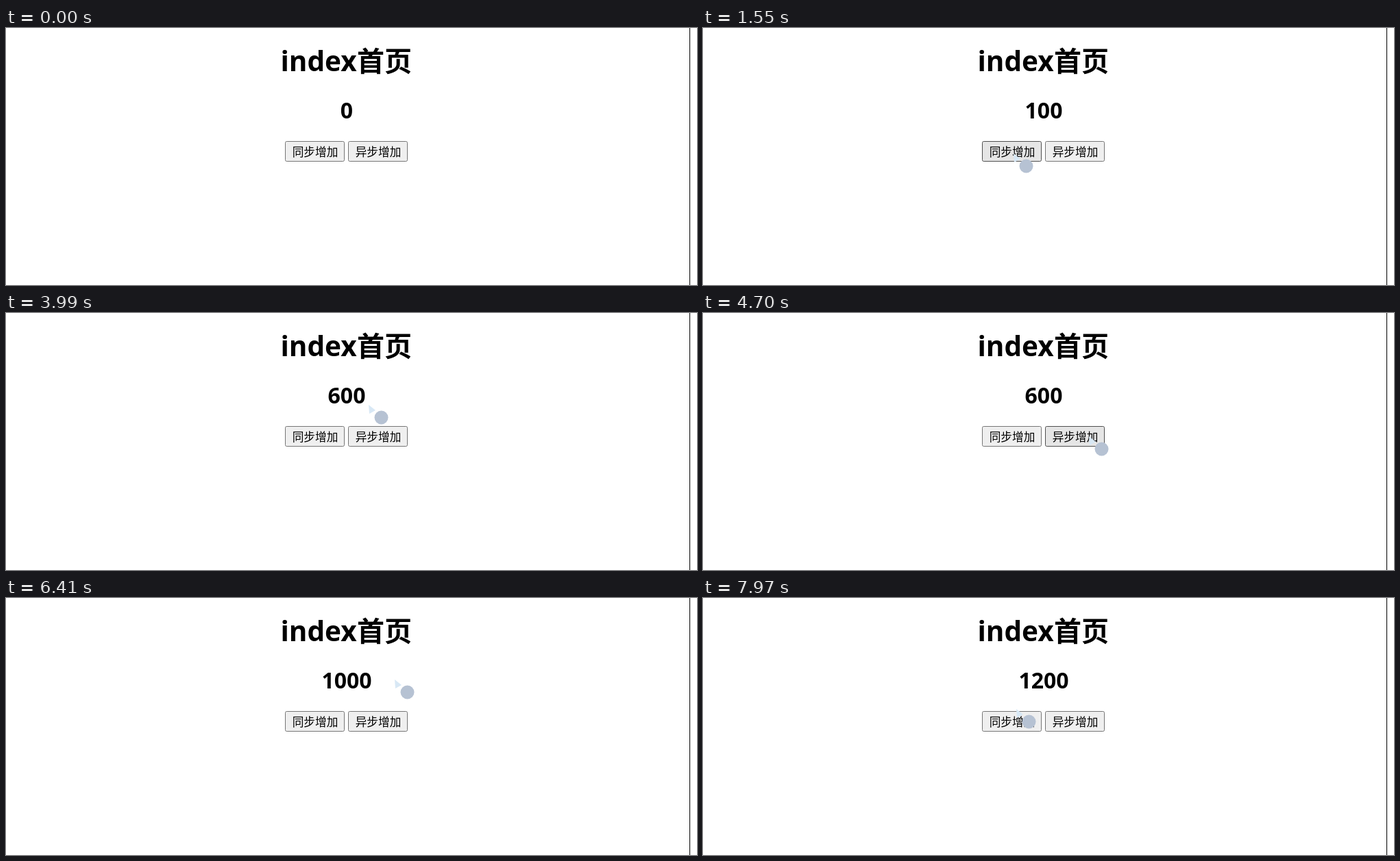
Animation of 1008x375 px, one loop 8000 ms. Source, as an HTML page with a canvas:

```html
<!DOCTYPE html>
<html lang="zh-CN">
<head>
<meta charset="utf-8">
<title>index首页</title>
<style>
html, body { margin: 0; width: 100%; height: 100%; overflow: hidden; background: #fff; }
canvas { display: block; }
</style>
</head>
<body>
<canvas id="stage" width="1008" height="375"></canvas>
<script>
const ctx = document.getElementById('stage').getContext('2d');
const LOOP = 8000, START = 70, OFFSET = 46, STEP = 78.4;
const HOLD = 2, DELAY = 4; // ticks a button stays down, ticks an async add takes
const CJK = '"Noto Sans CJK SC", "Noto Sans CJK", sans-serif';
const LATIN = '"Open Sans", "Noto Sans", sans-serif';

// Eased pointer moves: start tick, end tick, then where the tip arrives
const entry = { x: 921, y: 352 };
const moves = [
  [0, 8, 446, 205], [8, 16, 453, 183],
  [46, 51, 538, 128], [54, 58, 563, 180],
  [66, 69, 545, 144], [69, 72, 566, 174],
  [77, 82, 567, 113], [83, 85, 566, 171],
  [89, 94, 633, 94], [94, 99, 447, 108], [99, 101, 457, 162]
];

const buttons = [
  { x: 407, label: '同步增加', releases: [19, 24, 29, 32, 36, 40], add: 100, delay: 0 },
  { x: 499, label: '异步增加', releases: [65, 73, 87], add: 200, delay: DELAY }
];

function pointer(tick) {
  let { x, y } = entry;
  for (const [from, to, toX, toY] of moves) {
    const k = Math.max(0, Math.min(1, (tick - from) / (to - from)));
    const ease = k * k * (3 - 2 * k);
    x += (toX - x) * ease;
    y += (toY - y) * ease;
  }
  return { x: Math.round(x), y: Math.round(y) };
}

function count(tick) {
  return buttons.reduce((sum, b) =>
    sum + b.add * b.releases.filter(r => tick >= r + b.delay).length, 0);
}

function text(str, x, y, font, align = 'left') {
  ctx.font = font;
  ctx.textAlign = align;
  ctx.fillStyle = '#000';
  ctx.fillText(str, x, y);
}

function button({ x, label, releases }, tick, tip) {
  const over = tip && tip.x >= x && tip.x < x + 87 && tip.y >= 165 && tip.y < 195;
  const down = over && releases.some(r => tick >= r - HOLD && tick < r);
  const [fill, line] = down ? ['#f5f5f5', '#8d8d8d']
    : over ? ['#e5e5e5', '#4f4f4f'] : ['#efefef', '#767676'];
  ctx.beginPath();
  ctx.roundRect(x + 0.5, 165.5, 86, 29, 2);
  ctx.fillStyle = fill;
  ctx.fill();
  ctx.strokeStyle = line;
  ctx.stroke();
  text(label, x + 44, 186.7, '16.67px ' + CJK, 'center');
}

function cursor({ x, y }) {
  ctx.fillStyle = '#d8e8f5';
  ctx.beginPath();
  ctx.moveTo(x, y);
  ctx.lineTo(x + 10, y + 8);
  ctx.lineTo(x + 1, y + 13);
  ctx.fill();
  ctx.fillStyle = '#b6c2d3';
  ctx.beginPath();
  ctx.arc(x + 18.5, y + 18.5, 10, 0, Math.PI * 2);
  ctx.fill();
}

function draw(ms) {
  const tick = Math.floor((ms - OFFSET) / STEP);
  const tip = ms < START ? null : pointer(tick);
  ctx.fillStyle = '#fff';
  ctx.fillRect(0, 0, 1008, 375);
  ctx.fillStyle = '#000';
  ctx.fillRect(997, 0, 1, 375);
  text('index', 400.5, 63, 'bold 40.5px ' + LATIN);
  text('首页', 512, 63, 'bold 40px ' + CJK);
  text(String(count(tick)), 497, 132, 'bold 32px ' + LATIN, 'center');
  for (const b of buttons) button(b, tick, tip);
  if (tip) cursor(tip);
}

const begin = performance.now();
function frame() {
  draw((performance.now() - begin) % LOOP);
  requestAnimationFrame(frame);
}
frame();
</script>
</body>
</html>
```
